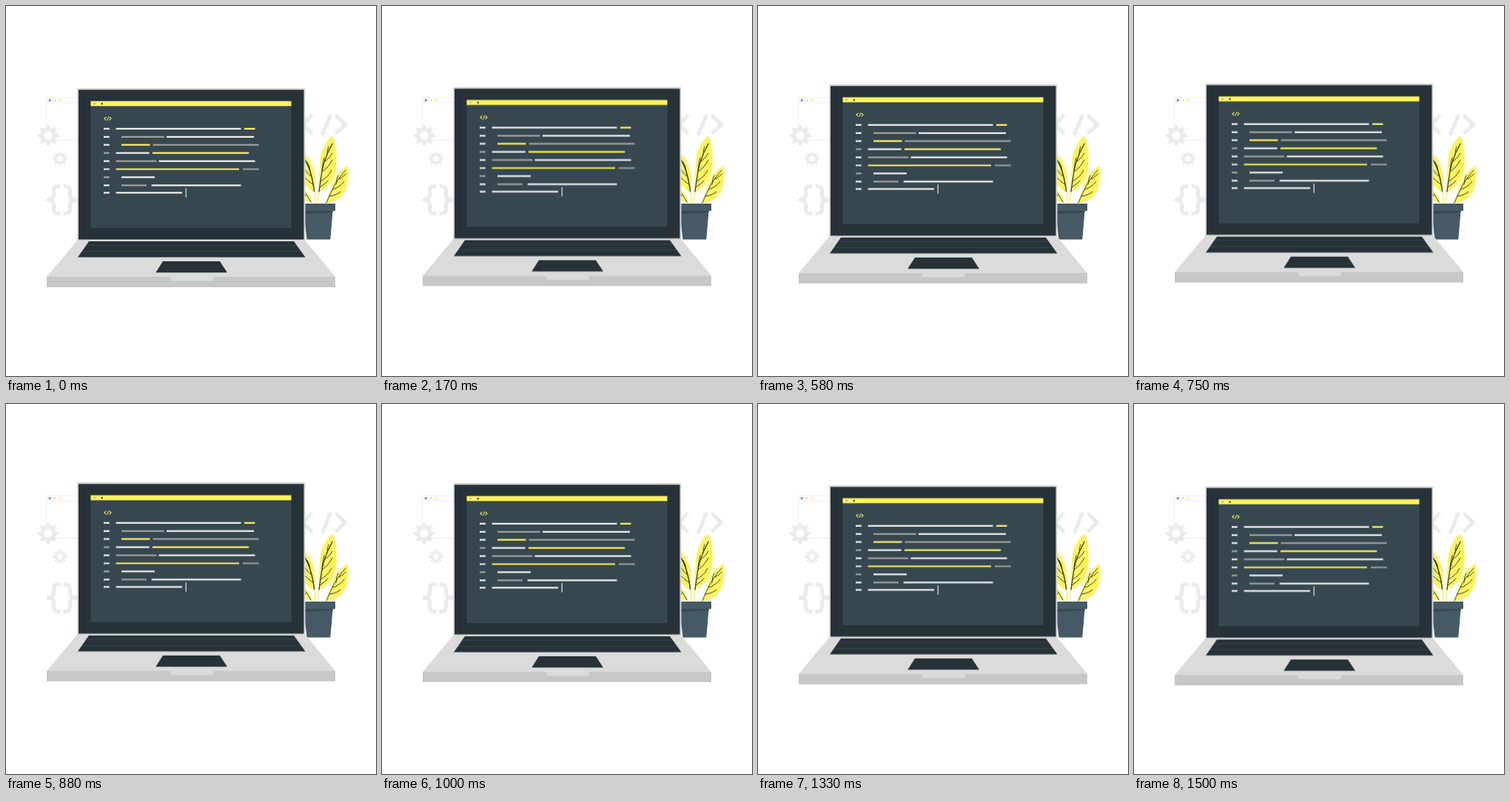
Animation of 500x500 px, one loop 1540 ms. Source, as an HTML page:

```html
<!DOCTYPE html>
<html lang="en">
<head>
<meta charset="utf-8">
<title>Floating laptop</title>
<style>
  html, body { margin: 0; width: 100%; height: 100%; overflow: hidden; background: #fff; }
  svg { display: block; width: 100%; height: 100%; }
  .line { fill: none; stroke-linecap: butt; }
  .pale { stroke: #ebebeb; }
  .white { stroke: #f0f0f0; }
  .grey { stroke: #a0a0a0; }
  .yellow { stroke: #fff35c; }
  .dark { fill: #263238; }
  .leaf { fill: #fff35c; }
  .vein { stroke: #263238; stroke-width: .9; stroke-linecap: round; }
  .laptop { animation: float 1540ms linear -35ms infinite; }
  @keyframes float {
    0%, 100% { transform: translateY(.3px); }
    50% { transform: translateY(-6.5px); }
  }
</style>
</head>
<body>
<svg viewBox="0 0 500 500">
  <defs>
    <g id="gear" class="line pale">
      <circle r="8.2" stroke-width="5.4"/>
      <circle r="12" stroke-width="4" pathLength="16" stroke-dasharray="1 1" stroke-dashoffset=".5"/>
    </g>
  </defs>

  <!-- backdrop -->
  <path class="line" stroke="#e6e6e6" stroke-width=".7" d="M100 124H54.5V181H100M54.5 130.8H100"/>
  <circle cx="59.2" cy="127.5" r="1.7" fill="#8c8c8c"/>
  <circle cx="66.3" cy="127.5" r="1.7" fill="#dedede"/>
  <circle cx="73" cy="127.5" r="1.7" fill="#fff35c"/>
  <use href="#gear" x="57" y="175"/>
  <use href="#gear" transform="translate(73 206.3) scale(.7)"/>
  <path class="line" stroke="#f7f7f7" stroke-width=".8" d="M54.5 161V189"/>
  <g class="line pale" stroke-width="5.2">
    <path d="M73.5 243.5H71Q64.5 243.5 64.5 250V255Q64.5 262 55 262Q64.5 262 64.5 269V274Q64.5 280.5 71 280.5H73.5"/>
    <path d="M77.5 243.5H80Q86.5 243.5 86.5 250V255Q86.5 262 96 262Q86.5 262 86.5 269V274Q86.5 280.5 80 280.5H77.5"/>
    <path d="M413.5 147.5L401.5 160.3L413.5 173M438.3 147L427.3 174.5M445.5 147.5L458.3 160.3L445.5 173"/>
  </g>

  <!-- plant -->
  <path class="line yellow" stroke-width="1.2" d="M417 248Q418 258 417.5 268M423 248Q421 258 422 268M440 257Q434 262 432 268"/>
  <path class="leaf" d="M441 175C436 179 427 190 424.5 206C422.5 222 424 238 422 252C433 246 443 238 446 222C448 206 447 188 441 175Z"/>
  <path class="leaf" d="M462 216C451 221 443 233 439 247C437 255 434 261 431.5 267C442 265 454 261 459.5 247C463 237 463 226 462 216Z"/>
  <path class="leaf" d="M398 194C408 202 416 213 417.5 227C419 239 418 246 417 253C410 248 403 242 398 230Z"/>
  <path class="leaf" d="M398 244C406 248 411 255 413.5 266C407 264 402 262 398 256Z"/>
  <g class="line vein">
    <path stroke-width="1.2" d="M441 186C434 199 429 211 427 224C425 235 424 244 423 251"/>
    <path d="M427 222Q428 211 430 205M431 210Q438 205 441 199M427 224Q436 218 441 208M425 237Q435 232 440 222M424 245Q431 241 435 236M434 200Q434 194 436 190"/>
    <path d="M459 222C449 232 441 246 433 266M446 241Q446 234 449 229M442 248Q451 245 457 237M437 257Q446 256 452 251M450 234Q456 231 459 227"/>
    <path stroke-width="1.3" d="M401 203C409 214 414 229 416.5 250"/>
    <path d="M411 222Q410 215 407 211M413 231Q408 228 404 221M415 241Q409 238 404 232M400 249Q407 254 412 265M406 256Q403 257 401 256"/>
  </g>
  <path fill="#455a64" d="M402 276H441.7L438.3 315.5H406.5Z"/>
  <path fill="#37474f" d="M403 276H441.8L441.5 278.5L405 281Z"/>
  <path fill="#455a64" d="M400 267H445V277H400Z"/>

  <g class="laptop">
    <!-- lid -->
    <path fill="#d6d6d6" d="M96 318V112.5Q96 111 97.5 111H403Q404.5 111 404.5 112.5V318Z"/>
    <path class="dark" d="M98 113.3H402.5V315.5H98Z"/>
    <path fill="#37474f" d="M114.5 128.6H385.5V300H114.5Z"/>
    <path fill="#fff35c" d="M114.5 128.6H385.5V135.3H114.5Z"/>
    <circle cx="119.7" cy="132" r="1.3" fill="#b5b19a"/>
    <circle cx="124.7" cy="132" r="1.3" fill="#fafafa"/>
    <circle cx="129.7" cy="132" r="1.3" fill="#37474f"/>

    <!-- code -->
    <path class="line yellow" stroke-width="1.1" d="M135.3 149.8L133 152.1L135.3 154.4M138.7 149.6L136.7 154.6M139.7 149.8L142 152.1L139.7 154.4"/>
    <g class="line" stroke-width="2.2">
      <path class="white" d="M132 165.8h7.8M132 176.8h7.8M132 187.7h7.8M132 209.6h7.8M132 220.5h7.8M132 242.3h7.8M132 252.3h7.8"/>
      <path class="grey" d="M132 198.6h7.8M132 231.4h7.8"/>
      <path class="white" d="M148.6 165.8H317.5M217 176.8H335M148.6 198.6H193.7M206.5 209.6H336.6M156 231.4H201M196.7 242.3H317.5M148.6 252.3H238"/>
      <path class="yellow" d="M322 165.8H336.5M156 187.7H194.5M198 198.6H328.2M148.6 220.5H315"/>
      <path class="grey" d="M156 176.8H213.5M198.6 187.7H341.5M148.6 209.6H203.3M320 220.5H341.7M156 242.3H189.8"/>
    </g>
    <path class="line white" stroke-width="1.1" d="M243.2 246.3V258.7"/>

    <!-- base -->
    <path fill="#dbdbdb" d="M96 317H404.5L445 366H55Z"/>
    <path class="dark" d="M112 318H389L404.5 339.5H97Z"/>
    <path class="line" stroke="#43535b" stroke-width=".6" d="M108.5 323.3H392.5M103 331.5H398.5"/>
    <path class="dark" d="M212 345H289L299 360.3H202.3Z"/>
    <path fill="#c7c7c7" d="M55 366H445V380H55Z"/>
    <path fill="#dbdbdb" d="M221 365.5H280.3L279 371.5H223Z"/>
  </g>
</svg>
</body>
</html>
```
